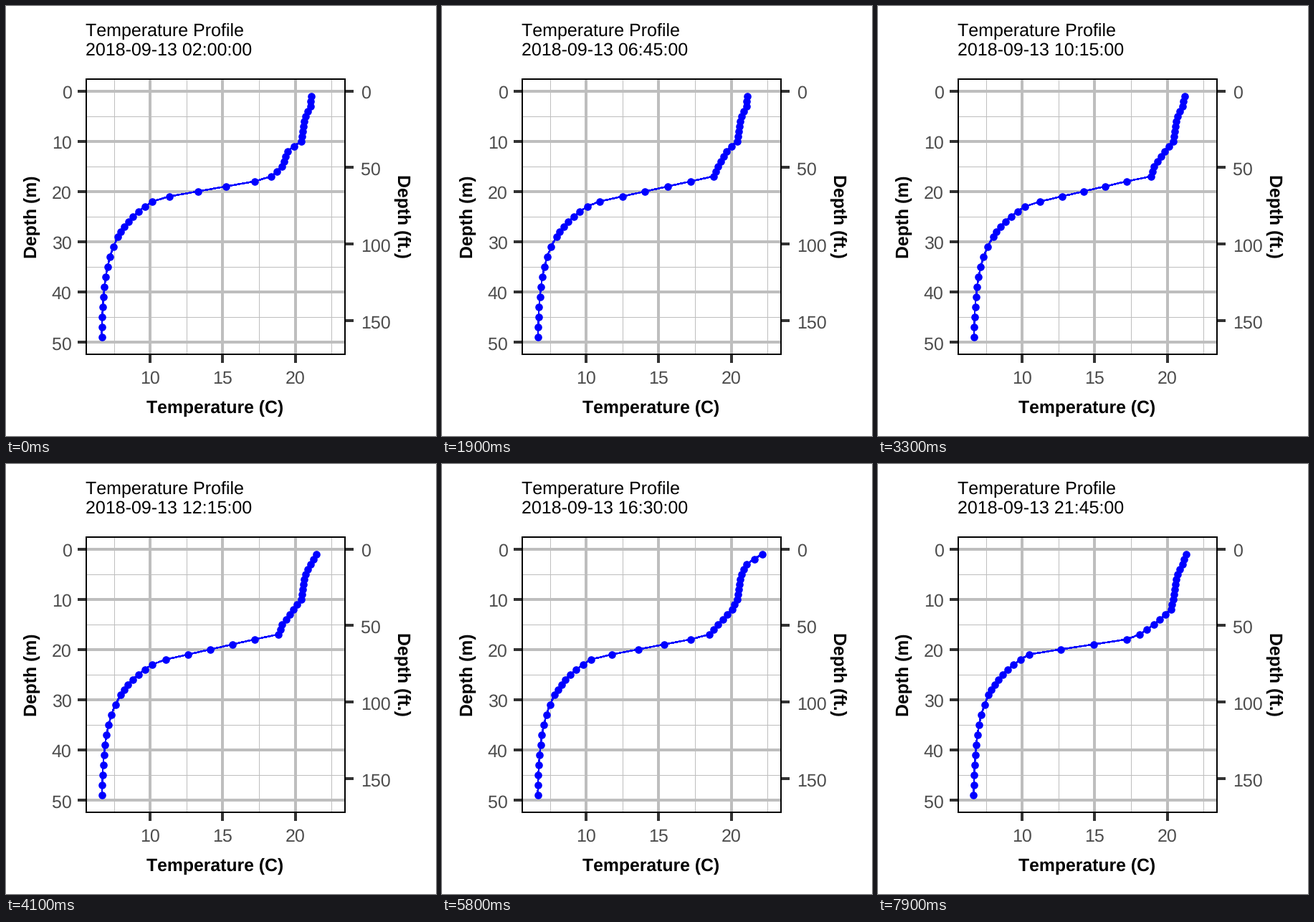
These frames come from a looping animation (600 by 600 pixels, 8000 ms). A matplotlib script:

```python
import matplotlib.pyplot as plt
import numpy as np
from matplotlib.animation import FuncAnimation
from matplotlib.patches import Rectangle

plt.rcParams.update({
    "font.family": "Liberation Sans",
    "font.size": 18,
    "text.hinting": "none",
    "text.kerning_factor": 6,  # effectively no kerning
})

SIZE, DPI = 600, 100
PX = 72 / DPI  # points per pixel
FRAMES, INTERVAL = 80, 100
LEFT, TOP, RIGHT, BOTTOM = 112, 102, 473, 486
TICK_LEN = 12
GRID, TICK, TICK_TEXT = "#bebebe", "#333333", "#4d4d4d"
DEPTHS = np.r_[1:30, 31:50:2]


def to_x(temp):
    return 201.3 + 20.225 * (temp - 10)


def to_y(depth):
    return 118.6 + 7.005 * depth


def profile(hour):
    """Water temperature at each depth for an hour of the day."""
    tide = np.cos(2 * np.pi * (hour - 10) / 26)
    surface = 21.1 + 1.03 * np.exp(-((hour - 16.5) / 4) ** 2)
    mixed = 19.39 + 0.04 * hour     # at 12 m, warming through the day
    shoulder = 18.5 + 0.4 * tide    # at 17 m, above the thermocline
    knee = 21.7 + 0.8 * tide        # depth where the thermocline ends

    upper = np.interp(DEPTHS,
                      [1, 3, 5, 10, 12, 15, 17, 18, knee],
                      [surface, 21.05, 20.7, 20.4, mixed, 19.1, shoulder, 17.2, 10.5])
    lower = 6.6 + 3.9 * np.exp(-(DEPTHS - knee) / 6.3)
    return np.where(DEPTHS < knee, upper, lower)


fig = plt.figure(figsize=(SIZE / DPI, SIZE / DPI), dpi=DPI, facecolor="white")
ax = fig.add_axes([0, 0, 1, 1])
ax.set(xlim=(0, SIZE), ylim=(SIZE, 0))
ax.axis("off")


def rule(x, y, color, width, z):
    ax.plot(x, y, color=color, lw=width * PX, solid_capstyle="butt", zorder=z)


def label(x, y, text, **style):
    return ax.text(x, y, text, va="baseline", rotation_mode="anchor", **style)


def axis_title(x, y, text, rotation=0):
    label(x, y, text, ha="center", weight="bold", size=17.8, rotation=rotation)


def grid(temps, depths, width, z):
    for temp in temps:
        rule([to_x(temp)] * 2, [TOP, BOTTOM], GRID, width, z)
    for depth in depths:
        rule([LEFT, RIGHT], [to_y(depth)] * 2, GRID, width, z)


def side_tick(edge, out, y, text, text_x, ha):
    rule(sorted([edge, edge + out]), [y, y], TICK, 4, 3)
    label(text_x, y + 10.4, text, ha=ha, color=TICK_TEXT)


temps, metres, feet = range(10, 21, 5), range(0, 51, 10), range(0, 151, 50)
grid(np.arange(7.5, 23, 5), range(5, 50, 10), 1, 1)
grid(temps, metres, 4, 2)

for temp in temps:
    x = to_x(temp)
    rule([x, x], [BOTTOM, BOTTOM + TICK_LEN], TICK, 4, 3)
    label(x, 527, str(temp), ha="center", color=TICK_TEXT)
for m in metres:
    side_tick(LEFT, -TICK_LEN, to_y(m), str(m), 91.5, "right")
for ft in feet:
    side_tick(RIGHT, TICK_LEN, to_y(ft * 0.3048), str(ft), 495, "left")

ax.add_patch(Rectangle((LEFT, TOP), RIGHT - LEFT, BOTTOM - TOP,
                       fill=False, ec="black", lw=2 * PX, zorder=6))

label(111, 42, "Temperature Profile")
stamp = label(111, 69, "")
axis_title(291.5, 568, "Temperature (C)")
axis_title(43, 294, "Depth (m)", 90)
axis_title(546, 293.5, "Depth (ft.)", -90)

curve, = ax.plot([], [], color="blue", lw=1.5 * PX, marker="o", ms=10.6 * PX,
                 mew=0, antialiased=False, zorder=5)


def update(frame):
    minutes = 120 + 15 * frame
    curve.set_data(to_x(profile(minutes / 60)), to_y(DEPTHS))
    stamp.set_text(f"2018-09-13 {minutes // 60:02d}:{minutes % 60:02d}:00")
    return curve, stamp


anim = FuncAnimation(fig, update, frames=FRAMES, interval=INTERVAL,
                     repeat=True, repeat_delay=0)
plt.show()
```
